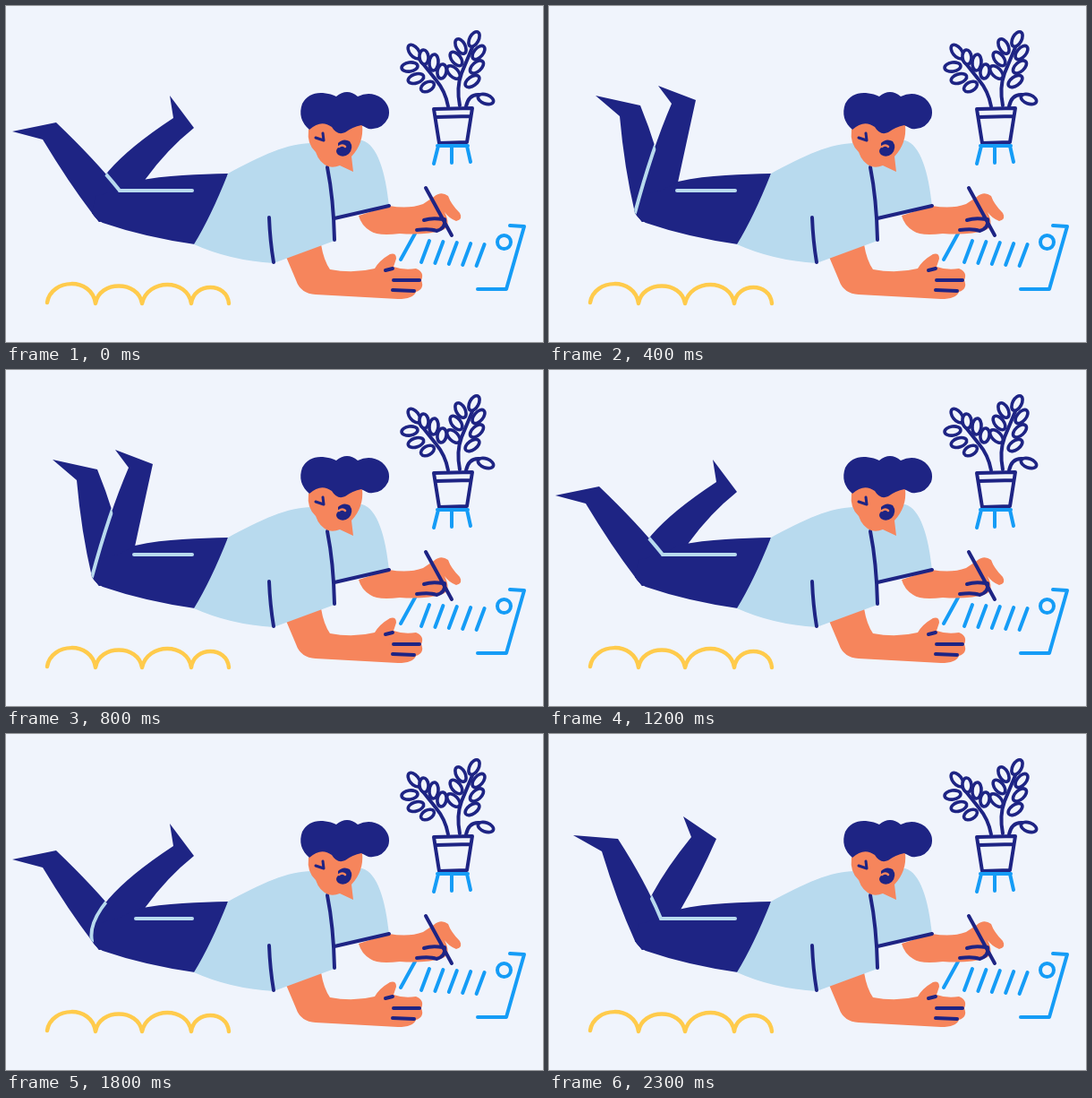
Recreate the animation shown at these times as an HTML page with a canvas. Size 600 by 375 pixels, loop 2400 ms.

```html
<!DOCTYPE html>
<html>
<head>
<meta charset="utf-8">
<style>
html, body { margin: 0; width: 100%; height: 100%; overflow: hidden; background: #f0f4fc; }
canvas { display: block; }
</style>
</head>
<body>
<canvas width="600" height="375"></canvas>
<script>
const ctx = document.querySelector('canvas').getContext('2d');
const NAVY = '#1e2484', SHIRT = '#b8daee', SKIN = '#f6855c', BLUE = '#159cf6', GOLD = '#ffcb4c', BG = '#f0f4fc';

// Lower leg from stretched (0) to folded (6):
// toe, ankle, heel, calf control, back of knee, shin control
const LEGS = [
  [7,140, 41,149, 56,130, 100,172, 127,206, 70,197],
  [27,113, 59,131, 77,117, 108,165, 125,206, 76,187],
  [52,100, 79,123, 102,111, 122,160, 131,206, 84,180],
  [87,92, 107,113, 133,105, 138,158, 140,200, 99,170],
  [122,89, 137,109, 164,105, 153,155, 144,197, 115,160],
  [150,92, 159,115, 187,117, 168,160, 147,196, 104,183],
  [183,100, 187,125, 210,136, 180,160, 156,193, 88,190]
];
const KNEE = '96 231';

function fill(d, color) {
  ctx.fillStyle = color;
  ctx.fill(new Path2D(d));
}

function line(d, color = NAVY, width = 4) {
  ctx.strokeStyle = color;
  ctx.lineWidth = width;
  ctx.stroke(new Path2D(d));
}

function leaf(x, y, deg, rx = 9) {
  ctx.beginPath();
  ctx.ellipse(x, y, rx, 5, deg * Math.PI / 180, 0, 7);
  ctx.fillStyle = BG;
  ctx.fill();
  ctx.strokeStyle = NAVY;
  ctx.lineWidth = 3.6;
  ctx.stroke();
}

function legParts(pose) {
  const [tx, ty, ax, ay, hx, hy, cx, cy, bx, by, sx, sy] = LEGS[pose];
  const calf = `Q${cx} ${cy} ${bx} ${by}`;
  return {
    shape: `M${ax} ${ay}L${tx} ${ty}L${hx} ${hy}${calf}L140 230L104 241L${KNEE}Q${sx} ${sy} ${ax} ${ay}`,
    calf: `M${hx} ${hy}${calf}`,
    shin: `M${ax} ${ay}Q${sx} ${sy} ${KNEE}`,
    cornerX: bx
  };
}

function drawLegs(pose) {
  const front = legParts(pose), back = legParts(6 - pose);
  fill(back.shape, NAVY);
  fill(front.shape, NAVY);
  fill(`M248 187C215 188 180 188 144 196L125 206L100 212L${KNEE}Q100 238 108 242Q155 258 211 266L240 230Z`, NAVY);
  // The seam shows only where the front leg overlaps the back one
  if (pose !== 3) {
    ctx.save();
    ctx.clip(new Path2D(back.shape));
    line(pose < 3 ? front.calf : front.shin, SHIRT);
    ctx.restore();
  }
  const seamX = pose < 3 ? front.cornerX : 139 + pose;
  line(`M${seamX} 206H208`, SHIRT);
}

function drawPlant() {
  line('M507 111Q503 91 509 75L524 39M494 112Q491 95 480 82L456 52M514 112Q517 98 529 99');
  [[523,37,-62], [508,45,62], [503,59,52], [500,74,45], [528,52,-50], [526,68,-42], [521,84,-36],
   [456,51,52], [467,57,85, 8], [478,63,95], [487,73,100, 8], [451,68,-8], [458,81,-18], [471,90,-28, 8],
   [536,104,20]].forEach(l => leaf(...l));
  line('M478 115L521 114L515 152L484 153ZM480 124L519 123');
  line('M482 156H516M483 156L478 176M498 156V175M515 156L519 174', BLUE);
}

function drawRuler() {
  line('M457 254L441 283', BLUE);
  for (let i = 0; i < 5; i++) {
    const x = 473 + i * 15.4, y = 262 + i;
    line(`M${x} ${y}L${x - 9} ${y + 24}`, BLUE);
  }
  line('M565 257A8 8 0 1 1 564.9 257', BLUE, 0.01);
  ctx.lineWidth = 4;
  ctx.beginPath();
  ctx.arc(556.5, 263.5, 7.5, 0, 7);
  ctx.stroke();
  line('M563 245L579 246L559 316L527 316', BLUE);
}

function drawArms() {
  fill('M394 234L428 223Q450 227 466 221L478 213Q486 206 494 212Q497 221 507 231Q511 238 503 240Q495 237 490 230Q498 246 488 250Q470 256 440 254Q415 257 407 251Q397 245 394 234', SKIN);
  line('M469 203L498 256M467 239Q476 236 488 238M459 250Q474 248 481 251Q492 248 490 238');
  fill('M313 280L352 266Q355 284 362 294Q388 299 412 293Q417 284 429 277Q436 275 436 282L433 291Q444 295 458 293Q468 297 464 306Q468 316 458 319Q455 327 438 327L346 322Q329 321 324 306Z', SKIN);
  line('M433 306H462M432 317L456 318M424 295L432 293');
}

function drawTorso() {
  fill('M248 187C285 167 315 153 342 153L398 150C415 155 424 185 428 223L367 238V262L299 287Q250 284 210 266Q229 235 248 187', SHIRT);
  line('M294 236Q295 262 299 286M359 180Q366 215 367 261M367 237L428 223');
}

function drawHead() {
  fill('M338 138L350 126L398 133Q400 153 386 168L388 185L373 178Q366 181 360 179Q350 175 346 163Q336 154 338 138', SKIN);
  fill('M339 138Q325 126 331 109Q338 96 354 97Q364 98 369 101Q381 91 393 101Q407 94 420 103Q431 113 427 125Q420 139 405 137Q399 134 397 133Q387 135 379 141Q370 145 364 135Q352 126 339 138', NAVY);
  line('M346 147L355 150L354 142', NAVY, 3);
  fill('M371 153Q377 147 384 151Q389 158 383 165Q377 170 371 166Q367 162 371 158Z', NAVY);
  line('M372 157Q376 154 379 157', SKIN, 2.5);
}

function draw() {
  const step = Math.floor(performance.now() / 100) % 12;
  ctx.lineCap = ctx.lineJoin = 'round';
  ctx.fillStyle = BG;
  ctx.fillRect(0, 0, 600, 375);
  drawPlant();
  drawRuler();
  line('M46 331C50 304 96 302 100 332C104 306 148 306 152 332C158 304 203 304 207 332C210 308 247 308 249 332', GOLD, 4.5);
  drawLegs(step <= 6 ? step : 12 - step);
  drawArms();
  drawTorso();
  drawHead();
  requestAnimationFrame(draw);
}
draw();
</script>
</body>
</html>
```
